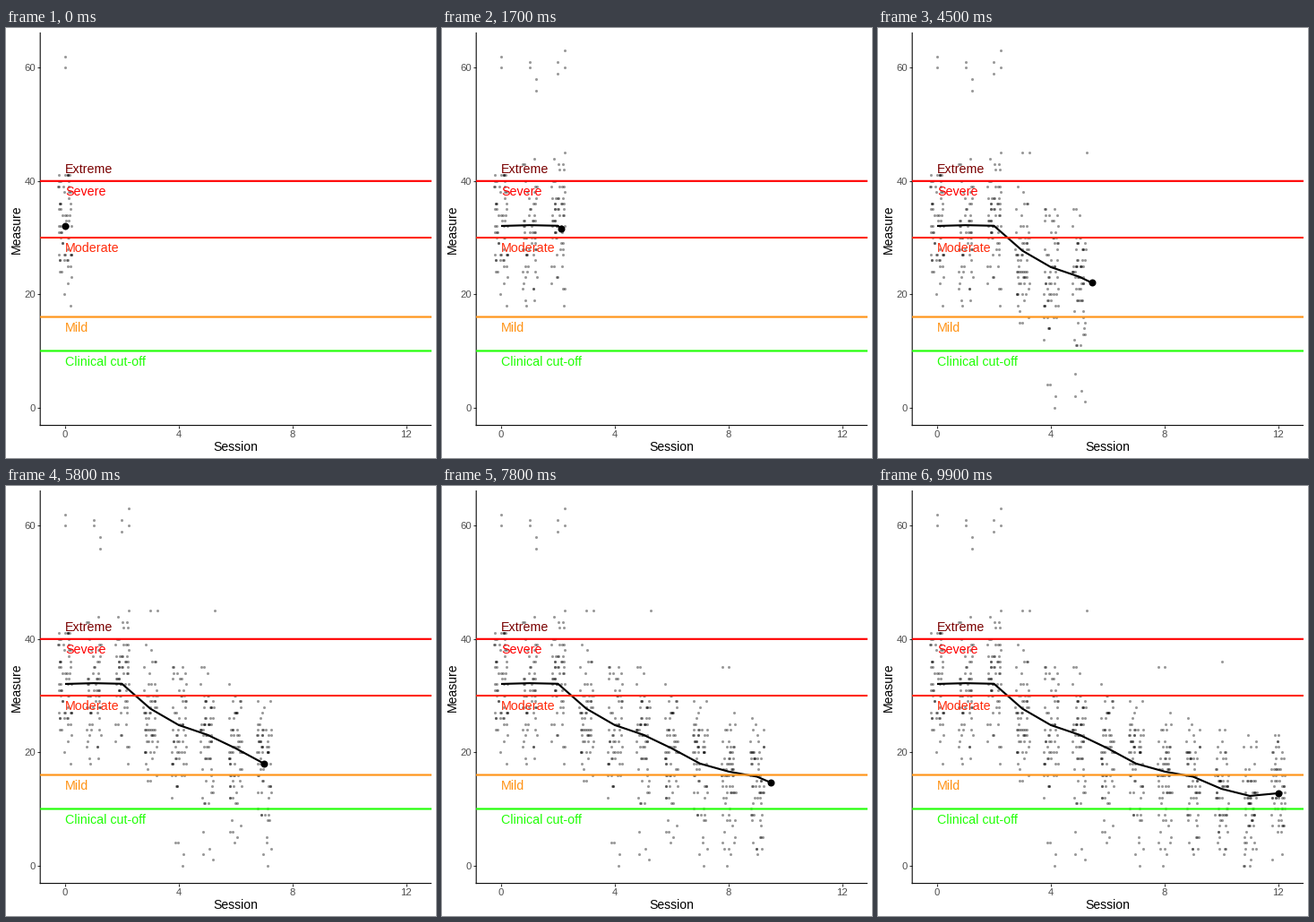
Animation of 480x480 px, one loop 10 s. Source, as a matplotlib script:

```python
import numpy as np
import matplotlib.pyplot as plt
from matplotlib.animation import FuncAnimation

SIZE, DPI = 480, 72
FRAMES, INTERVAL = 100, 100
LAST = 12

plt.rcParams["font.family"] = ["Liberation Sans", "DejaVu Sans"]

MEANS = [32.07, 32.2, 32.1, 27.7, 24.8, 23.1, 20.7,
         18.0, 16.6, 15.7, 13.55, 12.3, 12.77]

# Scores far above the rest, as (position, score)
HIGH = [(0, 62), (0, 60), (1, 61), (1, 60), (1.24, 58), (1.24, 56),
        (2, 61), (2, 59), (2.25, 63), (2.25, 60), (2.24, 45),
        (3, 45), (3.25, 45), (5.25, 45), (8.02, 35), (7.77, 35), (10.02, 36)]

DARK_RED, RED, SCARLET = "#7a0000", "#ff0000", "#ff2a0a"
ORANGE, GREEN = "#ff9315", "#21ff06"
LINES = [(40, RED), (30, SCARLET), (16, ORANGE), (10, GREEN)]
LABELS = [("Extreme", 42, DARK_RED), ("Severe", 38, RED),
          ("Moderate", 28, SCARLET), ("Mild", 14, ORANGE),
          ("Clinical cut-off", 8, GREEN)]

# Frame at which each session is reached
sessions = np.arange(LAST + 1)
keys = [round(k * (FRAMES - 1) / LAST) for k in range(LAST + 1)]


def session_points(k, rng, n=62):
    """Jittered integer scores around the session mean."""
    y = rng.triangular(MEANS[k] - 15, MEANS[k], MEANS[k] + 13, n)
    if 4 <= k <= 9:
        y = np.append(y, rng.uniform(0, 6, 4))
    x = k + rng.uniform(-0.25, 0.25, y.size)
    far = [p for p in HIGH if round(p[0]) == k]
    return np.vstack([np.column_stack([x, np.round(y).clip(0)]), *far])


def make_axes(fig):
    left, right, top, bottom = 38.2, 474.5, 5.5, 443.6
    ax = fig.add_axes([left / SIZE, 1 - bottom / SIZE,
                       (right - left) / SIZE, (bottom - top) / SIZE])
    ax.set_xlim(-0.875, 12.875)
    ax.set_ylim(-3.15, 66.15)
    ax.set_xticks([0, 4, 8, 12])
    ax.set_yticks([0, 20, 40, 60])
    ax.spines[["top", "right"]].set_visible(False)
    for side in ("left", "bottom"):
        ax.spines[side].set(linewidth=1.07, snap=False)
    ax.tick_params(length=2.75, width=1.07, pad=2.3, color="#333333",
                   labelcolor="#4d4d4d", labelsize=11.2)
    ax.set_xlabel("Session", fontsize=14, va="baseline")
    ax.set_ylabel("Measure", fontsize=14, va="baseline")
    ax.xaxis.set_label_coords(256.3 / SIZE, 1 - 472 / SIZE, fig.transFigure)
    ax.yaxis.set_label_coords(16 / SIZE, 1 - 224.6 / SIZE, fig.transFigure)
    return ax


fig = plt.figure(figsize=(SIZE / DPI, SIZE / DPI), dpi=DPI, facecolor="white")
ax = make_axes(fig)

rng = np.random.default_rng(12)
clouds = [ax.scatter(*session_points(k, rng).T, s=9.3, c="black", alpha=0.4,
                     linewidths=0, zorder=1) for k in sessions]
trend, = ax.plot([], [], color="black", lw=2.13, solid_capstyle="butt",
                 zorder=2)
head, = ax.plot([], [], "o", color="black", ms=8, mew=0, zorder=3)

for value, color in LINES:
    ax.axhline(value, color=color, lw=2.13, snap=False, zorder=4)
for name, value, color in LABELS:
    ax.annotate(name, (0, value), xytext=(0, -3.6),
                textcoords="offset points", color=color, fontsize=14.2,
                ha="left", va="baseline", zorder=5)


def update(i):
    x = np.interp(i, keys, sessions)
    y = np.interp(x, sessions, MEANS)
    done = int(x) + 1
    for k, cloud in enumerate(clouds):
        cloud.set_visible(k < done)
    trend.set_data([*range(done), x], [*MEANS[:done], y])
    head.set_data([x], [y])
    return [*clouds, trend, head]


anim = FuncAnimation(fig, update, frames=FRAMES, interval=INTERVAL,
                     repeat=True, repeat_delay=0)
plt.show()
```
